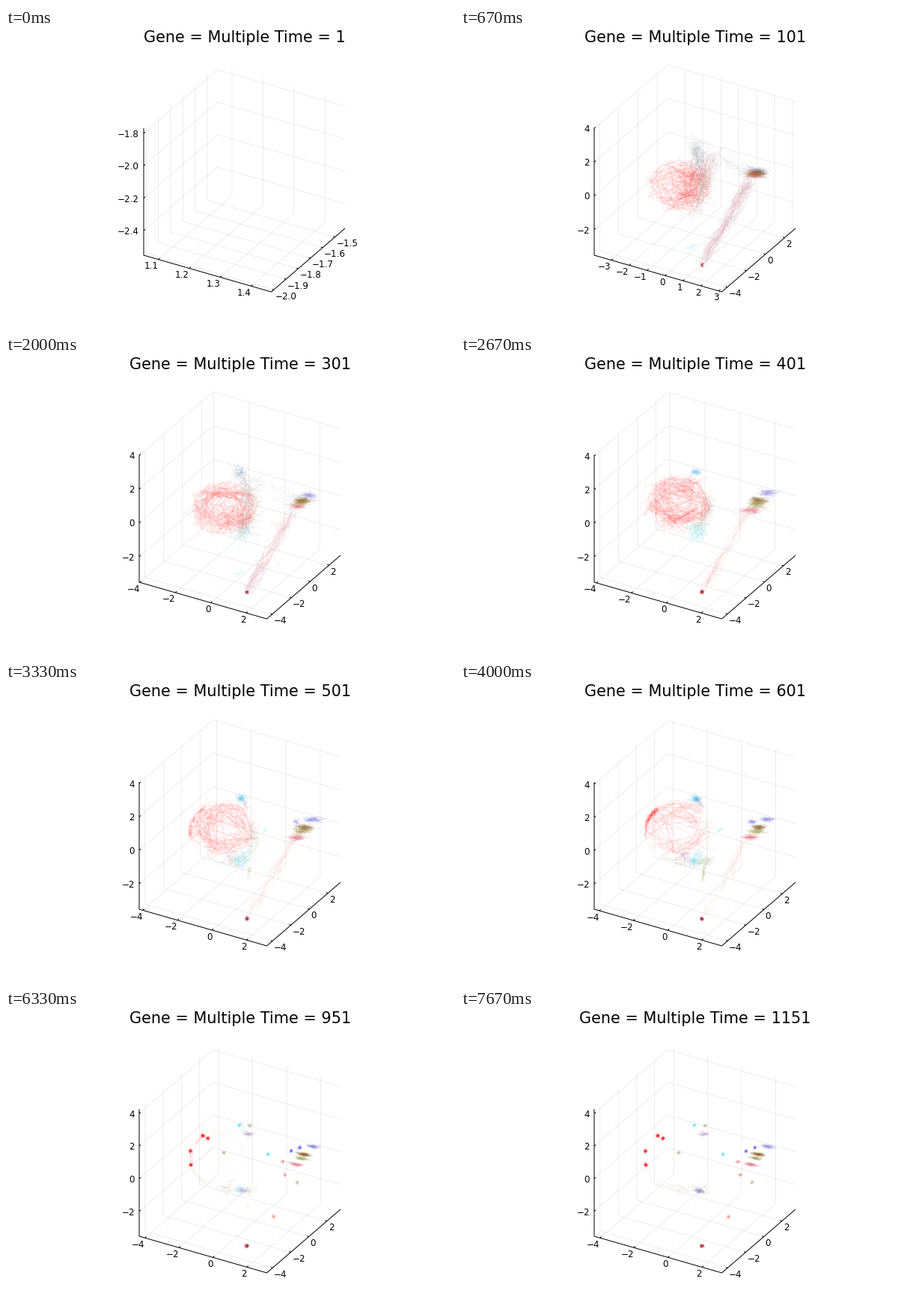
These frames come from a looping animation (600 px wide and 400 px high, 8000 ms). A matplotlib script:

```python
import math
import numpy as np
import matplotlib.pyplot as plt
from matplotlib.animation import FuncAnimation
from matplotlib.collections import LineCollection

LOOP_MS, TICK_MS, POSES = 8000, 50, 24
PX = 0.72                      # points per pixel at 100 dpi
DEPTH = np.array([98.5, -85.0])
WIDTH = np.array([170.5, 49.0])
HEIGHT = np.array([0.0, -170.0])

RED, ROSE, SALMON, DARK = "#ff1010", "#d84a60", "#f08078", "#a01018"
CYAN, SKY, BLUE, LILAC = "#20e8f8", "#50b0e8", "#3030f0", "#6868d8"
MAUVE, BROWN, OLIVE, BEIGE, GRAY = ("#8858a0", "#80500c", "#8c8c28",
                                    "#b0a888", "#808890")

# Points where the trajectories come to rest.
RESTS = {
    RED: [(263, 169.5), (270, 173), (246.5, 190), (247, 208.5)],
    CYAN: [(311.5, 155.3), (350, 194.5)],
    BLUE: [(381, 190), (393, 185.5)],
    SALMON: [(370, 204), (373, 222), (357.5, 278)],
    BEIGE: [(291, 192.5), (389, 232), (326, 156)],
}
STREAKS = {LILAC: (410, 184), BROWN: (398, 194.5),
           OLIVE: (395, 200), ROSE: (388, 208)}
KNOT, SINK = (393, 194), (322, 317)

fig = plt.figure(figsize=(6, 4), dpi=100, facecolor="white")


def ramp(k, start, end):
    return min(max((k - start) / (end - start), 0), 1)


def mix(a, b, t):
    return (1 - t) * np.asarray(a, float) + t * np.asarray(b, float)


def arc(start, end, cx=290, cy=200, rx=44, ry=38):
    a = np.radians(np.linspace(start, end, 25))
    return np.column_stack([cx + rx * np.cos(a), cy + ry * np.sin(a)])


def limits(k):
    if k == 0:
        return (1.053, 1.465), (-2.02, -1.418), (-2.552, -1.768)
    spread, rise = ramp(k, 4, 13), ramp(k, 4, 16) ** 2
    return ((-3.95 - 0.39 * spread, 3.17),
            (-4.57 - 0.08 * spread, 3.13 + 0.37 * spread),
            (-3.53, 4.01 + 0.25 * rise))


def ticks(low, high, step):
    """Yield each tick value with its fraction along the axis."""
    for i in range(math.ceil(low / step - 0.02),
                   math.floor(high / step + 0.02) + 1):
        yield i * step, (i * step - low) / (high - low)


class Scene:
    """One pose of the plot on its own axes."""

    def __init__(self, k):
        self.k = k
        self.rng = np.random.default_rng(100 + k)
        self.ax = fig.add_axes([0, 0, 1, 1], xlim=(0, 600), ylim=(400, 0))
        self.ax.axis("off")
        self.draw_axes()
        if k > 0:
            self.early = 1 - ramp(k, 4, 8)
            self.middle = ramp(k, 4, 8) * (1 - ramp(k, 8, 14))
            self.cooling = ramp(k, 8, 12) * (1 - ramp(k, 14, 20))
            self.settled = ramp(k, 12, 18)
            self.draw_sheet()
            self.draw_loop()
            self.draw_branch()
            self.draw_rests()

    def line(self, points, width=1.0, alpha=1.0):
        xs, ys = zip(*points)
        self.ax.plot(xs, ys, color="black", lw=width * PX, alpha=alpha,
                     solid_capstyle="butt")

    def text(self, text, x, y, ha, size=8.57):
        self.ax.text(x, y, text.replace("-", "\u2212"), ha=ha, va="baseline",
                     fontsize=size, family="DejaVu Sans")

    def draw_axis(self, limit, step, along, side, wall, tick, offset, ha):
        """Draw grid, ticks and labels of the axis starting at side."""
        for value, t in ticks(*limit, step):
            p = side + t * along
            self.line(p + np.array(wall), width=0.7, alpha=0.1)
            self.line([p, p + tick])
            text = f"{value:.1f}" if step < 1 else f"{value:.0f}"
            self.text(text, p[0] + offset[0], p[1] + offset[1], ha)

    def draw_axes(self):
        k, zero = self.k, np.zeros(2)
        corner = np.array([184.0 if k == 0 else 178.0, 304.0])
        x, y, z = limits(k)
        steps = (0.1, 0.1, 0.2) if k == 0 else (1 if k < 5 else 2, 2, 2)
        self.draw_axis(x, steps[0], WIDTH, corner,
                       [zero, DEPTH, DEPTH + HEIGHT],
                       0.02 * DEPTH, (0, 12.6), "right")
        self.draw_axis(y, steps[1], DEPTH, corner + WIDTH,
                       [zero, -WIDTH, HEIGHT - WIDTH],
                       -0.014 * WIDTH, (1.8, 12.5), "left")
        self.draw_axis(z, steps[2], HEIGHT, corner,
                       [zero, DEPTH, DEPTH + WIDTH],
                       0.02 * DEPTH, (-6, 5), "right")
        self.line([corner + HEIGHT, corner, corner + WIDTH,
                   corner + WIDTH + DEPTH])
        self.text(f"Gene = Multiple Time = {1 + 50 * k}", corner[0] + 135, 19,
                  "center", 14.95)

    def walk(self, color, path, spread, count, tilt=0, step=0.12, alpha=0.09):
        """Draw noisy random walks that drift to and fro along a path."""
        n = round(count)
        if n < 1:
            return
        path = np.atleast_2d(np.asarray(path, float))
        u = self.rng.uniform(0, 1, (n, 1))
        u = u + np.cumsum(self.rng.normal(0, step, (n, 8)), axis=1)
        u = 1 - np.abs(1 - u % 2)
        knots = np.linspace(0, 1, len(path))
        dx, dy = (s * self.rng.normal(0, 1, u.shape) for s in spread)
        c, s = math.cos(math.radians(tilt)), math.sin(math.radians(tilt))
        xs = np.interp(u, knots, path[:, 0]) + c * dx - s * dy
        ys = np.interp(u, knots, path[:, 1]) + s * dx + c * dy
        self.ax.add_collection(LineCollection(
            np.stack([xs, ys], axis=-1), colors=color, alpha=alpha,
            linewidths=0.7 * PX))

    def draw_loop(self):
        """Red cycle on the left, cooling into an arc."""
        cy = 198 + 14 * self.early
        ring = arc(0, 360, cy=cy, rx=30, ry=27)
        self.walk(RED, ring, (8, 7), 38 * self.early + 62 * self.middle,
                  step=0.22, alpha=0.085)
        self.walk(RED, arc(150, 400, cy=cy, rx=38, ry=33), (4, 3),
                  10 * self.early + 22 * self.middle, step=0.08)
        self.walk(RED, [(303, 216)], (14, 13), 26 * self.early)
        self.walk(SALMON, ring, (6, 6), 10 * self.cooling)
        self.walk(RED, arc(165, 235), (2, 2), 32 * self.cooling, alpha=0.12)
        self.walk(SALMON, arc(235, 310), (4, 4), 12 * self.cooling)
        self.walk(BEIGE, arc(168, 80), (2, 2),
                  4 * (self.cooling + self.settled), alpha=0.12)

    def draw_sheet(self):
        """Middle sheet splitting into an upper and a lower group."""
        top, low = (314, 156), (310, 240)
        self.walk(GRAY, [(312, 156), (322, 190), (318, 244)], (7, 7),
                  46 * self.early)
        self.walk(ROSE, [(330, 175), (322, 215)], (7, 9), 14 * self.early)
        self.walk(BEIGE, [(330, 185), (330, 215), low], (6, 6),
                  14 * self.early + 26 * self.middle)
        self.walk(CYAN, [(316, 237)], (8, 8), 14 * self.middle, alpha=0.08)
        self.walk(SKY, [top], (4.5, 3), 16 * self.middle + 8 * self.cooling)
        self.walk(CYAN, [top], (3, 3), 9 * self.cooling, alpha=0.12)
        self.walk(MAUVE, [top, (324 + 10 * self.settled, 168 + 14 * self.settled)],
                  (2, 2.5), 13 * self.cooling)
        self.walk(CYAN, [(341, 201), (350, 195)], (1.3, 1.3), 7 * self.cooling)
        self.walk(MAUVE, [(324, 167)], (4.5, 1.8), 10 * ramp(self.k, 16, 18))

        self.walk(BEIGE, [(286, 242), low, (332, 240)], (4, 4),
                  20 * self.cooling + 5 * self.settled, alpha=0.12)
        self.walk(OLIVE, [(326, 244), (323, 264)], (1.5, 3), 11 * self.cooling)
        self.walk(CYAN, [low], (2.5, 3), 10 * self.cooling)
        self.walk(MAUVE, [(299, 233)], (4, 3.5), 6 * self.cooling)
        late = ramp(self.k, 16, 23)
        self.walk(SKY, [mix(low, (318, 243), late)], (4, 2.2),
                  9 * self.settled, 15)
        self.walk(MAUVE, [(319, 243)], (4.5, 2), 13 * late, 15)

    def draw_branch(self):
        """Right-hand knot sorting into streaks, and the trail below it."""
        trail = [(387, 202), SINK]
        for color, count in ((ROSE, 24), (SALMON, 18), (LILAC, 8), (GRAY, 8)):
            self.walk(color, trail, (6, 5), count * self.early, step=0.17,
                      alpha=0.08)
        self.walk(SALMON, trail, (4, 4), 30 * self.middle, step=0.17, alpha=0.055)
        self.walk(SALMON, [(374, 214), (359, 276)], (3, 3), 9 * self.cooling,
                  alpha=0.07)
        self.walk(GRAY, [(322, 168), KNOT], (7, 6), 18 * self.early, alpha=0.07)
        self.walk(CYAN, [(304, 296), (316, 289)], (3, 2), 6 * self.early)

        wide = max(self.early, self.middle)
        for color, rest in STREAKS.items():
            center = mix(rest, KNOT, 0.8 * self.early)
            self.walk(color, [center], (5 + 2.5 * wide, 1.5 + 1.7 * wide),
                      (26 if color == BROWN else 17), 9 * self.settled, alpha=0.1)
        self.walk(BLUE, [(389, 187)], (3, 2.6), 12 * self.cooling)
        self.walk(DARK, [SINK], (1.6, 1.6), 19 * (1 - 0.5 * self.early), alpha=0.13)

    def draw_rests(self):
        size = 2.3 - 0.9 * self.settled
        for color, points in RESTS.items():
            for point in points:
                self.walk(color, [point], (size, size),
                          (20 if color == RED else 11) * self.settled, alpha=0.13)


scenes = [Scene(k) for k in range(POSES)]


def show(tick):
    k = min(int((tick + 1) * TICK_MS * POSES / LOOP_MS), POSES - 1)
    for scene in scenes:
        scene.ax.set_visible(scene.k == k)
    return []


anim = FuncAnimation(fig, show, frames=LOOP_MS // TICK_MS, interval=TICK_MS,
                     repeat=True, repeat_delay=0, init_func=lambda: [])
plt.show()
```
